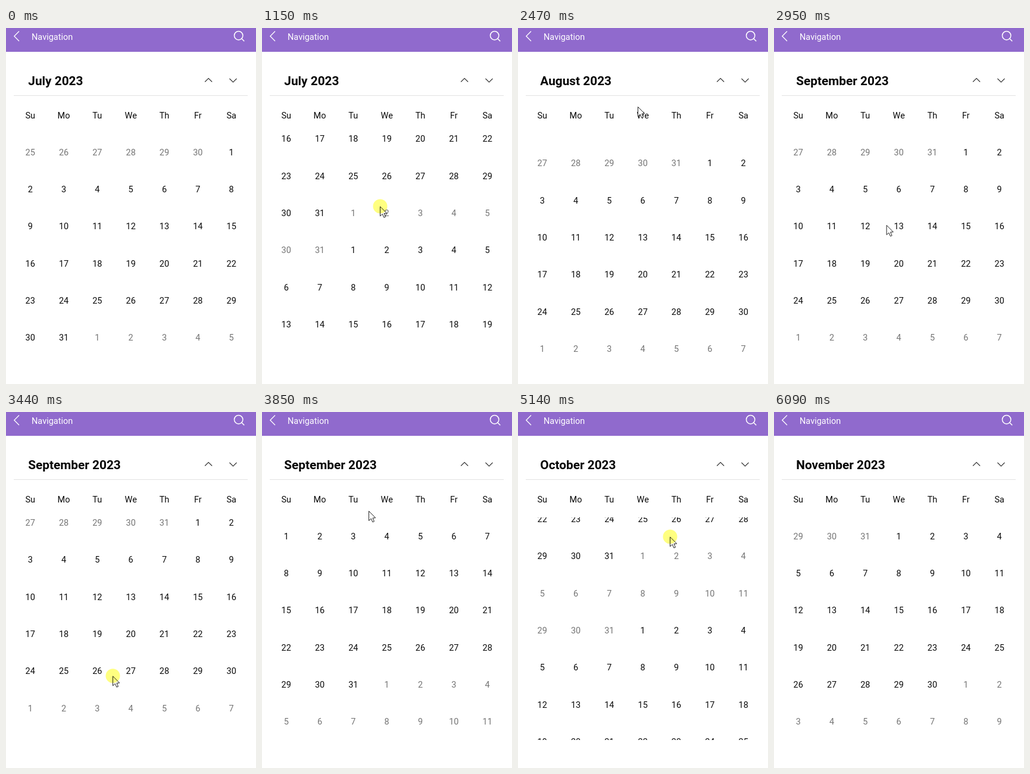
An HTML page with a canvas that plays this animation: 420 by 598 pixels, repeating every 6560 ms.

```html
<!DOCTYPE html>
<html lang="en">
<head>
<meta charset="utf-8">
<title>Calendar navigation</title>
<style>
  html, body { margin: 0; width: 100%; height: 100%; overflow: hidden; background: #fff; }
  canvas { display: block; width: 420px; height: 598px; }
</style>
</head>
<body>
<canvas id="stage"></canvas>
<script>
const W = 420, H = 598, LOOP = 6560;
const TOP = 177, PAGE = 374, ROW = PAGE / 6;
const COL_X = 40.7, COL_W = 56.33;
const FONT = 'Roboto, Arial, sans-serif';
const INK = '#0c0c0c', GREY = '#757575';
const DAYS = ['Su', 'Mo', 'Tu', 'We', 'Th', 'Fr', 'Sa'];
const MONTHS = ['July', 'August', 'September', 'October', 'November'];

// Each swipe: finger travels for DRAG ms, lets go after HOLD ms,
// then the page eases into place and the title follows.
const DRAG = 240, HOLD = 205, SLOP = 20, DECAY = 66, TITLE_DELAY = 690;
const APPROACH = 815, SETTLE = 100;
const SWIPES = [
  { start: 1013, x: 198, from: 529, to: 146 },
  { start: 2190, x: 201, from: 497, to: 132 },
  { start: 3371, x: 179, from: 486, to: 166 },
  { start: 4925, x: 255, from: 445, to: 195 }
];
const ENTRY = [387, 606], EXIT = [333, 553];
const SHOW = 390, LEAVE = 5812, HIDE = 6040;

const canvas = document.getElementById('stage');
const ctx = canvas.getContext('2d');
const dpr = window.devicePixelRatio || 1;
canvas.width = W * dpr;
canvas.height = H * dpr;

const progress = (t, start, span) => Math.max(0, Math.min(1, (t - start) / span));
const smooth = u => u * u * (3 - 2 * u);
const mix = (a, b, u) => a + (b - a) * u;

// The picture advances in steps of just under 70 ms.
function step(t) {
  if (t < SHOW) return t;
  const [base, size] = t < 4110 ? [SHOW, 69] : [4110, 68];
  return base + Math.floor((t - base) / size) * size;
}

const fingerY = (s, t) => mix(s.from, s.to, smooth(progress(t, s.start, DRAG)));
const dragged = (s, t) => Math.max(0, s.from - fingerY(s, t) - SLOP);

function swipeOffset(s, t) {
  const release = s.start + HOLD;
  if (t < release) return dragged(s, t);
  const rest = (PAGE - dragged(s, release)) * Math.exp((release - t) / DECAY);
  return PAGE - (rest < 3 ? 0 : rest);
}

function pointerAt(t) {
  let [x, y] = ENTRY;
  for (const s of SWIPES) {
    const begin = s.start - APPROACH;
    if (t < begin) break;
    const u = smooth(progress(t, begin, APPROACH - SETTLE));
    x = mix(x, s.x, u);
    y = t < s.start ? mix(y, s.from, u) : fingerY(s, t);
  }
  const out = progress(t, LEAVE, 202);
  return [mix(x, EXIT[0], out), mix(y, EXIT[1], out)];
}

function label(str, x, y, size, color, align = 'center', weight = 400) {
  ctx.font = `${weight} ${size}px ${FONT}`;
  ctx.textAlign = align;
  ctx.fillStyle = color;
  ctx.fillText(str, x, y);
}

function stroke(color, width, points) {
  ctx.beginPath();
  points.forEach(([x, y]) => ctx.lineTo(x, y));
  ctx.strokeStyle = color;
  ctx.lineWidth = width;
  ctx.stroke();
}

// Vertical chevron with its tip at (x, y); positive h opens downwards.
const chevron = (x, y, h) => stroke('#333', 1.1, [[x - 6, y + h], [x, y], [x + 6, y + h]]);

function drawBar() {
  ctx.fillStyle = '#906acd';
  ctx.fillRect(0, 0, W, 40);
  stroke('#fff', 1.3, [[22, 5.5], [13.8, 13.7], [22, 22]]);
  label('Navigation', 43, 19.5, 14.5, '#fff', 'left');
  ctx.beginPath();
  ctx.arc(390.7, 12.7, 7.2, 0, 2 * Math.PI);
  ctx.lineWidth = 1.5;
  ctx.stroke();
  stroke('#fff', 1.5, [[395.8, 17.8], [400.3, 22.3]]);
}

function drawHeader(t) {
  const month = SWIPES.filter(s => t >= s.start + TITLE_DELAY).length;
  label(MONTHS[month] + ' 2023', 37.3, 95.8, 20.8, '#060606', 'left', 700);
  chevron(340.2, 84.5, 6);
  chevron(381.5, 91, -6);
  ctx.fillStyle = '#e2e2e2';
  ctx.fillRect(13, 113, 393, 1);
  DAYS.forEach((d, i) => label(d, COL_X + i * COL_W, 151.8, 14.5, INK));
}

function drawMonth(index, top) {
  const month = 6 + index;
  const lead = new Date(2023, month, 1).getDay();
  for (let i = 0; i < 42; i++) {
    const day = new Date(2023, month, 1 - lead + i);
    const x = COL_X + (i % 7) * COL_W;
    const y = top + (Math.floor(i / 7) + 0.5) * ROW + 5.6;
    label(day.getDate(), x, y, 14.5, day.getMonth() === month ? INK : GREY);
  }
}

function drawDays(t) {
  const scroll = SWIPES.reduce((sum, s) => sum + swipeOffset(s, t), 0);
  ctx.save();
  ctx.beginPath();
  ctx.rect(0, TOP, W, PAGE);
  ctx.clip();
  MONTHS.forEach((_, i) => {
    const shift = i * PAGE - scroll;
    if (Math.abs(shift) < PAGE) drawMonth(i, TOP + shift);
  });
  ctx.restore();
}

function drawPointer(t) {
  if (t < SHOW || t > HIDE) return;
  const [x, y] = pointerAt(t);
  ctx.save();
  ctx.translate(x + 0.5, y + 0.5);
  const arrow = new Path2D('M0 0V16L3.8 12.6L6.4 18.4L9 17.3L6.5 11.6L11.2 11.3Z');
  ctx.fillStyle = '#fff';
  ctx.fill(arrow);
  ctx.strokeStyle = '#222';
  ctx.lineWidth = 1;
  ctx.stroke(arrow);
  if (SWIPES.some(s => t >= s.start - 80 && t <= s.start + HOLD + 10)) {
    ctx.globalCompositeOperation = 'multiply';
    ctx.beginPath();
    ctx.arc(0, -0.5, 12, 0, 2 * Math.PI);
    ctx.fillStyle = '#ffff80';
    ctx.fill();
  }
  ctx.restore();
}

function draw(now) {
  const t = step(now % LOOP);
  ctx.setTransform(dpr, 0, 0, dpr, 0, 0);
  ctx.fillStyle = '#fff';
  ctx.fillRect(0, 0, W, H);
  drawBar();
  drawHeader(t);
  drawDays(t);
  drawPointer(t);
}

let origin = null;
function tick(now) {
  if (origin === null) origin = now;
  draw(now - origin);
  requestAnimationFrame(tick);
}
draw(0);
requestAnimationFrame(tick);
</script>
</body>
</html>
```
